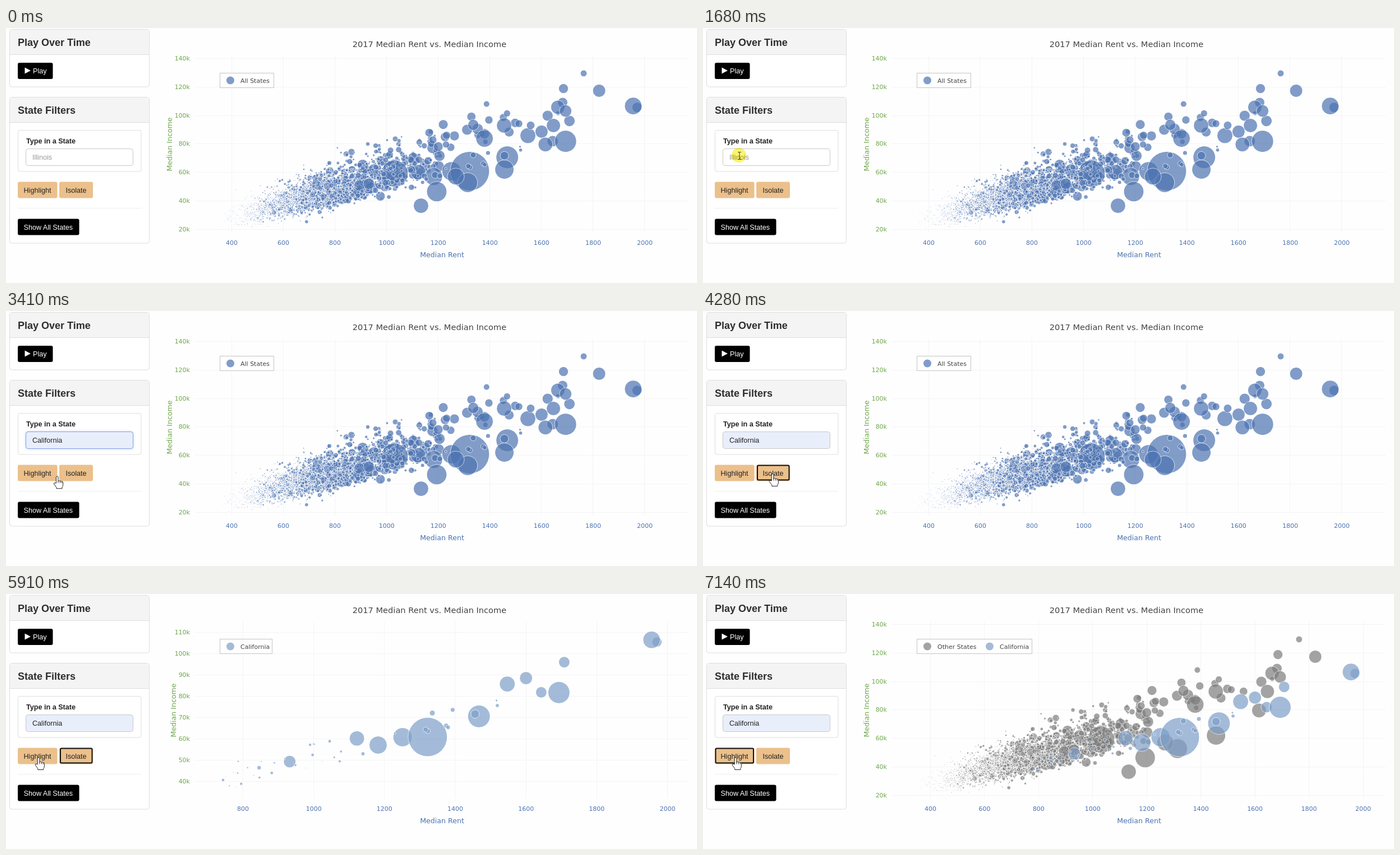
Write an HTML page with a canvas that moves like this. It is 1232 px wide and 455 px high and loops after 8000 ms.

```html
<!DOCTYPE html>
<html lang="en">
<head>
<meta charset="utf-8">
<title>Median Rent vs. Median Income</title>
<style>
html, body { margin: 0; width: 100%; height: 100%; overflow: hidden; background: #fefefe; }
canvas, svg { position: absolute; left: 0; top: 0; width: 1232px; height: 455px; display: block; }
.ui { font: 12.6px "Liberation Sans", Arial, sans-serif; fill: #222; }
.head { font-size: 18px; font-weight: bold; fill: #2e2e2e; }
.bold { font-weight: bold; }
.plot { font: 11px "DejaVu Sans", Verdana, sans-serif; fill: #444; }
.title { font-size: 14.6px; }
.mid { text-anchor: middle; }
.end { text-anchor: end; }
.xc { fill: #4c72b0; }
.yc { fill: #6fa64a; }
.axis { font-size: 12.6px; }
#glow { filter: drop-shadow(0 0 2px rgba(102,150,233,.45)); }
#menu { filter: drop-shadow(0 2px 2px rgba(0,0,0,.35)); }
#click { mix-blend-mode: multiply; }
</style>
</head>
<body>
<canvas id="dots" width="1232" height="455"></canvas>
<svg id="stage" viewBox="0 0 1232 455" xmlns="http://www.w3.org/2000/svg"></svg>
<script>
const BLUE = '#4c72b0', PALE = '#7d9ec8', GREY = '#7c7c7c';
const LOOP = 8000;

// An axis maps its first tick to a pixel and goes on at a fixed scale.
const axis = (first, pixel, scale, step, last) => ({
  px: n => pixel + (n - first) * scale,
  value: p => first + (p - pixel) / scale,
  ticks: Array.from({ length: (last - first) / step + 1 }, (_, i) => first + i * step)
});
const wideY = axis(20, 359, -2.5417, 20, 140);
const views = [
  { x: axis(400, 402.5, .46031, 200, 2000), y: wideY, titleX: 296, boxW: 97,
    legend: [['All States', BLUE, 400]] },
  { x: axis(800, 422.5, .63083, 200, 2000), y: axis(40, 334, -3.793, 10, 110), titleX: 303, boxW: 94,
    legend: [['California', PALE, 400]] },
  { x: axis(400, 405.5, .48219, 200, 2000), y: wideY, titleX: 296, boxW: 206,
    legend: [['Other States', GREY, 400], ['California', PALE, 511]] }
];

let seed = 2017;
function random() {
  seed = (seed + 0x6d2b79f5) | 0;
  let n = Math.imul(seed ^ (seed >>> 15), 1 | seed);
  n = (n + Math.imul(n ^ (n >>> 7), 61 | n)) ^ n;
  return ((n ^ (n >>> 14)) >>> 0) / 4294967296;
}
const gauss = () => Math.sqrt(-2 * Math.log(1 - random())) * Math.cos(2 * Math.PI * random());
const many = (length, make) => Array.from({ length }, make);

// Counties are [rent, income in thousands, radius]; income and size rise with rent.
function ordinaryCounty() {
  const rent = 712 * Math.exp(.235 * gauss());
  const wobble = Math.max(.13, .2 - rent / 12000);
  const income = (50 + (rent - 829) * .052) * Math.exp(wobble * gauss());
  const spread = 1.35 * (Math.max(0, rent - 350) / 480) ** 1.7 * Math.exp(.65 * gauss());
  return [rent, income, .9 + Math.min(spread, 9)];
}
function costlyCounty() {
  const rent = 1160 + 540 * random() ** 1.5;
  const income = (77 + (rent - 1160) * .05) * Math.exp(.1 * gauss());
  return [rent, income, 4 + 6 * random()];
}
function stateCounty() {
  const u = random() ** 2;
  const rent = 740 + 820 * u;
  const income = 41 + (rent - 760) * .045 + 3.5 * gauss();
  return [rent, income, .9 + 3 * random() ** 2 + 4.5 * u * random()];
}

// The largest counties stand out and are placed one by one.
const stateLandmarks = [
  [1970, 105.5, 9], [1955, 106.5, 15.5], [1708, 96, 10], [1600, 88.5, 11.5], [1547, 85.7, 14],
  [1643, 81.8, 10], [1693, 81.7, 19.5], [1467, 70.5, 20], [1456, 71.6, 7.5], [1251, 60.7, 17],
  [1322, 60.8, 35], [1182, 57, 16], [1122, 60.1, 13.5], [932, 49.2, 11]
];
const otherLandmarks = [
  [1763, 129.4, 6], [1823, 117.2, 11.5], [1663, 105.6, 12.5], [1693, 103, 11], [1646, 92.8, 12.5],
  [1615, 79.5, 13], [1455, 92.8, 13.5], [1379, 83.7, 15.5], [1456, 61.9, 17], [1133, 36.5, 13.5],
  [1194, 46.4, 18], [1314, 52.7, 17.5], [1268, 57, 15], [1031, 59, 24], [825, 43.2, 14]
];
const stateDots = [...stateLandmarks, ...many(38, stateCounty)];
const cloud = many(3100, ordinaryCounty)
  .filter(([rent, income]) => rent > 350 && rent < 1210 && income > 19.5);
const split = Math.round(cloud.length * .7);
const under = cloud.slice(0, split), over = cloud.slice(split);
const upper = [...many(30, costlyCounty), ...otherLandmarks];

const layers = [
  [[[...under, ...stateDots, ...upper, ...over], BLUE]],
  [[stateDots, PALE]],
  [[[...under, ...upper, ...over], GREY], [stateDots, PALE]]
];

const ctx = document.getElementById('dots').getContext('2d');
function disc(x, y, r) {
  ctx.beginPath();
  ctx.arc(x, y, r, 0, 2 * Math.PI);
}

function drawPlot(index) {
  const { x, y } = views[index];
  ctx.globalAlpha = 1;
  ctx.clearRect(0, 0, 1232, 455);
  ctx.fillStyle = '#f4f4f4';
  for (const n of x.ticks) ctx.fillRect(Math.floor(x.px(n)), 49, 1, 316);
  for (const n of y.ticks) ctx.fillRect(336, Math.round(y.px(n)), 881, 1);
  ctx.globalAlpha = .7;
  ctx.strokeStyle = '#fff';
  ctx.lineWidth = .9;
  for (const [points, color] of layers[index]) {
    ctx.fillStyle = color;
    for (const [rent, income, r] of points) {
      disc(x.px(rent), y.px(income), r - .4);
      ctx.fill();
      disc(x.px(rent), y.px(income), r);
      ctx.stroke();
    }
  }
}

const text = (x, y, s, cls = 'ui', extra = '') => `<text x="${x}" y="${y}" class="${cls}" ${extra}>${s}</text>`;
const box = (x, y, w, h, fill, stroke = 'none', r = 3, extra = '') =>
  `<rect x="${x}" y="${y}" width="${w}" height="${h}" rx="${r}" fill="${fill}" stroke="${stroke}" ${extra}/>`;

const panel = (y, h, headH, title) =>
  box(6.5, y, 249, h, '#fff', '#ddd', 4) +
  `<path d="M7 ${y + headH}V${y + 4}q0-3.5 3.5-3.5H251.5q3.5 0 3.5 3.5V${y + headH}Z" fill="#f4f4f4"/>` +
  `<path d="M7 ${y + headH}H255" stroke="#ddd"/>` + text(21, y + 29, title, 'ui head');

const button = (x, y, w, label, fill, color, textX) =>
  box(x, y, w, 29, fill) + text(textX, y + 19, label, 'ui', `style="fill:${color}"`);

function plotLabels(v, i) {
  const key = ([label, color, x]) =>
    `<circle cx="${x}" cy="93.5" r="7" fill="${color}" opacity=".7"/>` + text(x + 18, 98, label, 'plot');
  return `<g id="view${i}">` +
    v.x.ticks.map(n => text(v.x.px(n), 387, n, 'plot mid xc')).join('') +
    v.y.ticks.map(n => text(328, v.y.px(n) + 4, n + 'k', 'plot end yc')).join('') +
    text(0, 0, 'Median Income', 'plot mid axis yc', `transform="translate(${v.titleX} 207.5) rotate(-90)"`) +
    box(381.5, 80.5, v.boxW - 1, 26, '#fff', '#c4c4c4', 0) +
    v.legend.map(key).join('') + '</g>';
}

document.getElementById('stage').innerHTML =
  panel(2.5, 102.5, 45, 'Play Over Time') +
  button(21, 62, 62.5, 'Play', '#000', '#fff', 48) +
  '<path d="M33.5 70.5V81.5L44 76Z" fill="#fff"/>' +
  panel(123.5, 260.5, 45, 'State Filters') +
  box(21.5, 182.5, 219.5, 73.5, '#fff', '#ddd') +
  text(36, 206, 'Type in a State', 'ui bold') +
  box(35.5, 215.5, 191, 30, '#fff', '#c8c8c8', 4, 'id="field"') +
  box(35.5, 215.5, 191, 30, '#fff', '#86a6e2', 4, 'id="glow"') +
  text(47, 235, 'Illinois', 'ui', 'id="hint" style="fill:#999"') +
  text(47, 235, 'California', 'ui', 'id="value"') +
  '<path id="caret" d="M47.5 223V239" stroke="#111"/>' +
  button(21, 274.5, 70.5, 'Highlight', '#ebc08b', '#222', 31.5) +
  button(95, 274.5, 60, 'Isolate', '#ebc08b', '#222', 106.5) +
  box(22.5, 275.5, 67.5, 26, 'none', '#111', 2, 'id="ringHighlight" stroke-width="2"') +
  box(97, 275.5, 56.5, 26, 'none', '#111', 2, 'id="ringIsolate" stroke-width="2"') +
  '<path d="M21 321.5H241" stroke="#eee"/>' +
  button(21, 340.5, 109.5, 'Show All States', '#000', '#fff', 31.5) +
  '<g id="menu">' + box(35.5, 247, 192, 47.5, '#fff', 'none', 1) +
  box(35.5, 254.5, 192, 32, '#c8c8c8', 'none', 0, 'id="hover"') + text(46, 275.5, 'California') + '</g>' +
  text(755, 34, '2017 Median Rent vs. Median Income', 'plot mid title') +
  text(777.5, 409, 'Median Rent', 'plot mid axis xc') +
  views.map(plotLabels).join('') +
  '<circle id="click" r="13" fill="#fbf56a"/>' +
  '<g id="cursor" stroke-linejoin="round">' +
  '<path id="arrow" d="M0 0V14.5L3.3 11.4 5.7 17 8.2 16 5.8 10.5H10.4Z" fill="#fff" stroke="#222"/>' +
  '<path id="beam" d="M-3-6.5h2q1 0 1 1q0-1 1-1h2M0-5.5V5.5M-3 6.5h2q1 0 1-1q0 1 1 1h2" fill="none" stroke="#333"/>' +
  '<g id="hand" stroke="#222"><path d="M-1.8 12V1.5a1.8 1.8 0 0 1 3.6 0V8q1.8-1.6 3.4.3q1.8-1 3 .6q2.2-.6 2.2 1.8V15' +
  'q0 2.5-1.6 4.5V21.5H-1.2V19.5L-5.6 13.5q-1-2.2 1-2.2Z" fill="#fff"/>' +
  '<path d="M1.8 8v3.5M5.2 8.6v3M8.2 9.2v2.6"/></g></g>';

const el = {};
document.querySelectorAll('[id]').forEach(node => el[node.id] = node);
const show = (id, on) => { el[id].style.display = on ? '' : 'none'; };

// Moves: start, end, number of steps, way points.
const moves = [
  [370, 600, 4, [[920, 451], [1208, 451]]],
  [750, 1370, 9, [[1208, 451], [65, 228]]],
  [2000, 2230, 4, [[65, 228], [73, 260]]],
  [3020, 3800, 11, [[73, 260], [86, 296], [124, 291]]],
  [5440, 5910, 7, [[124, 291], [92, 297], [58, 292]]]
];
const clicks = [1680, 2530, 4200, 6310];
const within = (t, a, b) => t >= a && t < b;
const ease = p => p * p * (3 - 2 * p);

function cursorAt(t) {
  const move = moves.filter(m => t >= m[0]).pop();
  if (!move) return null;
  const [start, end, steps, path] = move;
  const step = Math.min(steps, 1 + Math.floor((t - start) / (end - start) * (steps - 1) + .05));
  const along = ease(step / steps) * (path.length - 1);
  const i = Math.min(Math.floor(along), path.length - 2), f = along - i;
  return [0, 1].map(k => path[i][k] + (path[i + 1][k] - path[i][k]) * f);
}

let current = -1;
function render(t) {
  const view = t < 4580 ? 0 : t < 7140 ? 1 : 2;
  if (view !== current) {
    drawPlot(current = view);
    views.forEach((_, i) => show('view' + i, i === view));
  }
  const filled = t >= 2150;
  const tint = filled ? '#e9eefb' : '#fff';
  el.field.setAttribute('fill', tint);
  el.glow.setAttribute('fill', tint);
  show('glow', within(t, 1760, 4200));
  show('hint', !filled);
  show('value', filled);
  show('caret', within(t, 1760, 2610));
  show('menu', within(t, 1760, 2610));
  show('hover', filled);
  show('ringIsolate', within(t, 4280, 6380));
  show('ringHighlight', t >= 6450);

  const pos = cursorAt(t);
  show('cursor', pos);
  show('click', clicks.some(start => within(t, start, start + 80)));
  if (!pos) return;
  const [x, y] = pos;
  const beam = within(t, 1300, 2150) && y < 247;
  const hand = t >= 3020 && y > 274;
  show('beam', beam);
  show('hand', hand);
  show('arrow', !beam && !hand);
  el.cursor.setAttribute('transform', `translate(${x} ${y})`);
  el.click.setAttribute('cx', x - 1);
  el.click.setAttribute('cy', y - 1);
}

function loop() {
  render(performance.now() % LOOP);
  requestAnimationFrame(loop);
}
loop();
</script>
</body>
</html>
```
